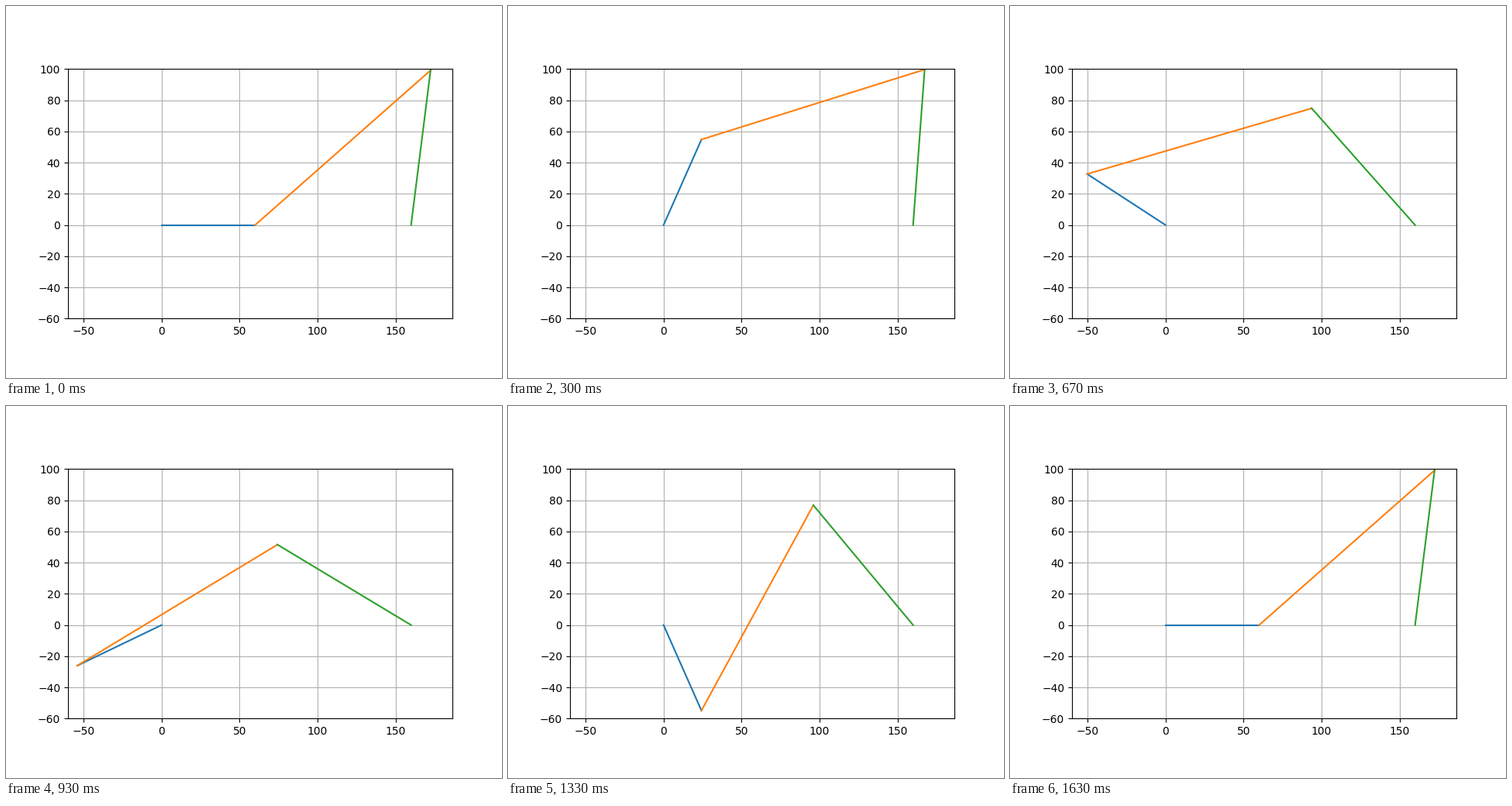
Animation, 640 px wide and 480 px high, one loop 1660 ms. Source, as a matplotlib script:

```python
import numpy as np
import matplotlib.pyplot as plt
from matplotlib.animation import FuncAnimation

# Four-bar linkage: link lengths
CRANK, COUPLER, ROCKER, GROUND = 60, 150, 100, 160
STEPS = 50
TICK = 10     # ms
TICKS = 166   # one loop of 1660 ms

angles = np.linspace(0, 2 * np.pi, STEPS)


def joints(theta):
    """Crank pin and rocker pin for a crank angle."""
    ax_, ay = CRANK * np.cos(theta), CRANK * np.sin(theta)
    dx, dy = ax_ - GROUND, ay
    d = np.hypot(dx, dy)
    inner = np.arccos((d**2 + ROCKER**2 - COUPLER**2) / (2 * d * ROCKER))
    phi = np.arctan2(dy, dx) - inner
    return (ax_, ay), (GROUND + ROCKER * np.cos(phi), ROCKER * np.sin(phi))


# Shift the angle so that the rocker pin stays above the ground link
right = joints(angles)[1][0].max()

fig, ax = plt.subplots(figsize=(6.4, 4.8), dpi=100)
ax.set_aspect("equal")
ax.set_xlim(-CRANK, right)
ax.set_ylim(-CRANK, ROCKER)
ax.grid()

crank, = ax.plot([], [])
coupler, = ax.plot([], [])
rocker, = ax.plot([], [])


def update(tick):
    # Each pose lasts 100/3 ms, rounded to whole ticks
    step = (3 * tick + 1) // 10
    a, b = joints(angles[step])
    for line, p, q in ((crank, (0, 0), a), (coupler, a, b),
                       (rocker, b, (GROUND, 0))):
        line.set_data([p[0], q[0]], [p[1], q[1]])
    return crank, coupler, rocker


anim = FuncAnimation(fig, update, frames=TICKS, interval=TICK,
                     repeat=True, repeat_delay=0)
plt.show()
```
